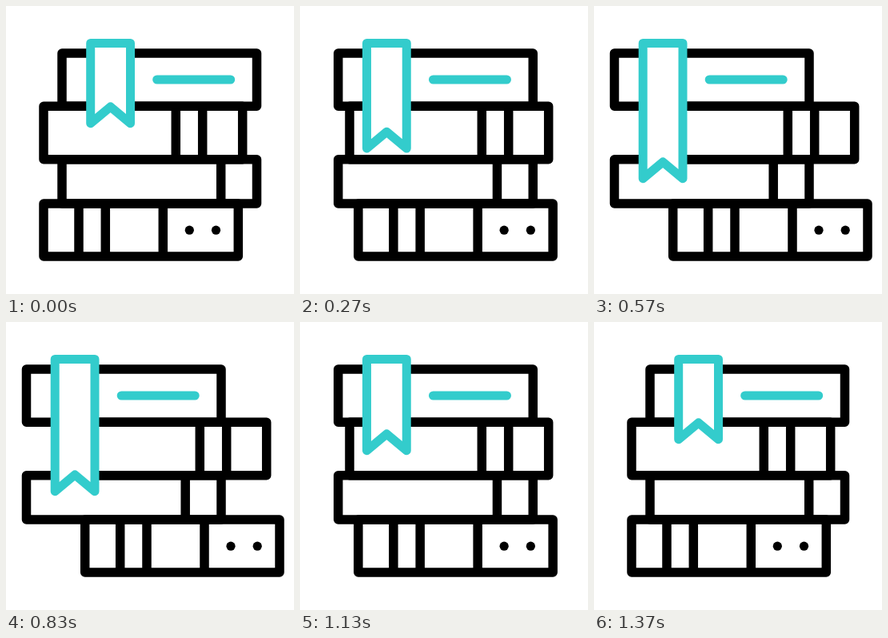
Animation, 360 px wide and 360 px high, one loop 1670 ms. Source, as an HTML page:

```html
<!DOCTYPE html>
<html lang="en">
<head>
<meta charset="utf-8">
<title>Stack of books</title>
<style>
  html, body { margin: 0; width: 100%; height: 100%; overflow: hidden; background: #fff; }
  svg { display: block; width: 100%; height: 100%; }
  path { fill: none; stroke: #000; stroke-width: 11.5; stroke-linecap: round; stroke-linejoin: round; }
  .accent { stroke: #33cccc; stroke-width: 11; }
  #ribbon { fill: #fff; }
</style>
</head>
<body>
<svg viewBox="0 0 360 360">
  <g id="book4">
    <path d="M47 247H290.3V313H47ZM91 247V313M124.3 247V313M196.3 247V313"/>
    <circle cx="229.3" cy="280.2" r="5.6"/>
    <circle cx="262.5" cy="280.2" r="5.6"/>
  </g>
  <g id="book3"><path d="M70 191.7H313.5V247H70ZM268.7 191.7V247"/></g>
  <g id="book2"><path d="M47 125.3H295.7V191.7H47ZM212.3 125.3V191.7M245.7 125.3V191.7"/></g>
  <g id="book1">
    <path d="M70 59H313.5V125.3H70Z"/>
    <path class="accent" d="M188.7 92H280.7"/>
    <path class="accent" id="ribbon"/>
  </g>
</svg>
<script>
const LOOP = 1670, FRAME = 100 / 3;
const SHIFT = { book1: -44.5, book2: 30, book3: -44.5, book4: 51.7 };
const RIBBON_GROWTH = 69;
const $ = id => document.getElementById(id);

const progress = (frame, start, length) => Math.min(1, Math.max(0, (frame - start) / length));
const easeInOut = u => (1 - Math.cos(Math.PI * u)) / 2;
// Starts at the given speed and eases to a stop.
const easeFrom = (speed, u) => speed * u * (1 - u) ** 2 + u * u * (3 - 2 * u);

function draw(time) {
  const frame = Math.floor((time % LOOP + 4) / FRAME);
  const slide = easeInOut(progress(frame, 0, 16)) - easeInOut(progress(frame, 27, 14));
  const stretch = easeInOut(progress(frame, 0, 17)) - easeFrom(0.77, progress(frame, 24, 15));

  for (const [id, distance] of Object.entries(SHIFT))
    $(id).setAttribute("transform", `translate(${distance * slide} 0)`);

  const tip = 146.7 + RIBBON_GROWTH * stretch;
  $("ribbon").setAttribute("d", `M105.7 46.5H155.5V${tip}L130.6 ${tip - 20.7}L105.7 ${tip}Z`);
}

const begin = performance.now();
function tick() {
  draw(performance.now() - begin);
  requestAnimationFrame(tick);
}
tick();
</script>
</body>
</html>
```
